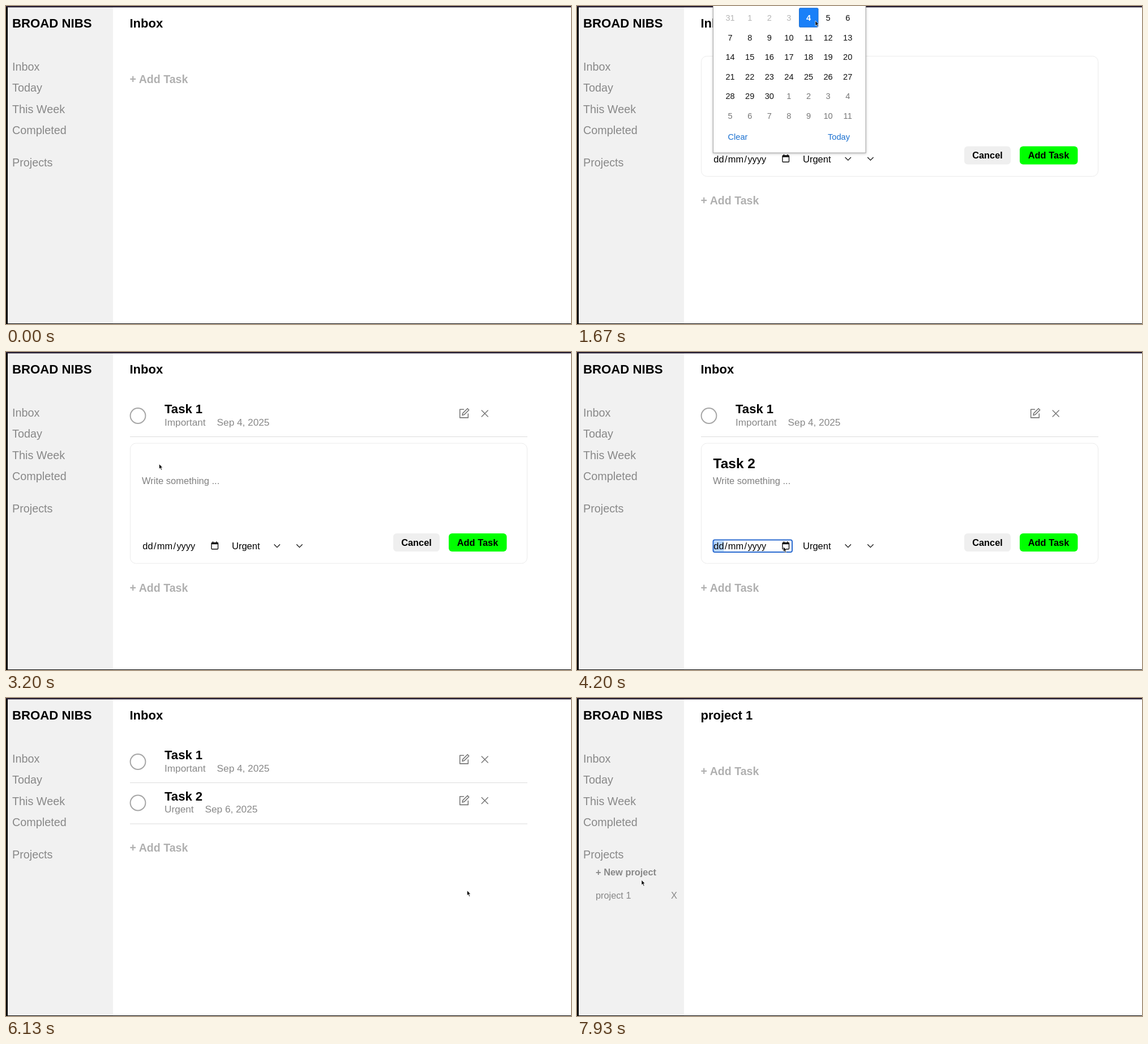
An HTML page for the animation above (8 s loop, 998 px wide and 561 px high).

```html
<!DOCTYPE html>
<html lang="en">
<head>
<meta charset="utf-8">
<title>Task list</title>
<style>
  html, body { margin: 0; width: 100%; height: 100%; overflow: hidden; background: #fff; }
  svg { display: block; width: 100vw; height: 100vh; }
  text { font-family: "Liberation Sans", Arial, sans-serif; }
  .b { font-weight: 700; }
  .m { text-anchor: middle; }
  .line { fill: none; stroke-linecap: round; stroke-linejoin: round; }
  .popup { filter: drop-shadow(0 1px 2px rgba(0, 0, 0, .25)); }
</style>
</head>
<body>
<svg id="stage" viewBox="0 0 998 561"></svg>
<script>
const LOOP = 8000, TICK = LOOP / 120, ROW = 72.5, MOVE = 240;
const GREY = '#888', LEVELS = ['Urgent', 'Important', 'Optional'];
const stage = document.getElementById('stage');

// Both tasks are filled in by the same routine, the second one slower
const rounds = [
  { start: 590, pace: 1, y: 0, title: 'Task 1', day: 4, level: 0 + 1 },
  { start: 3190, pace: 1.25, y: ROW, title: 'Task 2', day: 6, level: 0 }
];
const step = { type: 270, typed: 600, focus: 800, open: 870, pick: 1140, menu: 1460, choose: 1690, list: 1870, submit: 2200 };
const project = { open: 6520, input: 6980, type: 7050, typed: 7500, done: 7590 };

const colX = i => 270.6 + 34.6 * (i % 7);
const rowY = i => 20.8 + 34.55 * Math.floor(i / 7);
const at = (r, u) => r.start + u * r.pace;
const within = (t, a, b) => t >= a && t < b;

// Pointer stops: arrival time, x, y
const roundStops = r => [
  [210, 300, 124], [805, 364, 270.5], [1075, colX(r.day) + 11.5, 25.5],
  [1410, 446, 270], [1600, 452, 275 + 24 * r.level], [1870, 516, 268], [2075, 814, 266.5]
].map(([u, x, y]) => [at(r, u), x, y + r.y]);
const stops = [
  [130, 345, 235], [470, 272, 130], ...roundStops(rounds[0]),
  [3130, 270, 197], ...roundStops(rounds[1]),
  [6430, 60, 277], [6795, 147, 325.5], [6930, 113.5, 320.5]
];

const typed = (str, t, a, b) =>
  str.slice(0, Math.max(0, Math.ceil(str.length * (t - a) / (b - a))));
const text = (x, y, size, fill, str, cls = '') =>
  `<text x="${x}" y="${y}" font-size="${size}" fill="${fill}" class="${cls}">${str}</text>`;
const rect = (x, y, w, h, fill, more = '') =>
  `<rect x="${x}" y="${y}" width="${w}" height="${h}" fill="${fill}" ${more}/>`;
const line = (d, stroke, width) =>
  `<path class="line" d="${d}" stroke="${stroke}" stroke-width="${width}"/>`;
const shift = (y, body) => `<g transform="translate(0 ${y})">${body}</g>`;
const ring = (x, y, w, h) =>
  rect(x, y, w, h, 'none', 'rx="3" stroke="#2a6bd0" stroke-width="2"');
const chevron = x => line(`M${x} 267.3l4.8 4.8l4.8 -4.8`, '#111', 1.3);

function sidebar(t) {
  let s = rect(3, 2, 186, 558, '#f1f1f1') + text(11, 38, 22.2, '#000', 'BROAD NIBS', 'b');
  ['Inbox', 'Today', 'This Week', 'Completed'].forEach((name, i) =>
    s += text(11, 113.8 + 37.4 * i, 19.8, GREY, name));
  s += text(11, 283, 19.8, GREY, 'Projects');
  if (t >= project.open) s += text(33, 312.5, 16.4, GREY, '+ New project', 'b');
  if (within(t, project.input, project.done))
    s += rect(34, 337, 128, 23, '#fff') + ring(34, 337, 128, 23) +
         text(38, 353.8, 16.3, '#000', typed('project 1', t, project.type, project.typed));
  if (t >= project.done)
    s += text(33, 353.5, 16.3, GREY, 'project 1') + text(166, 353.5, 16.4, GREY, 'X');
  return s;
}

function task(r) {
  const level = LEVELS[r.level];
  return shift(r.y,
    '<circle cx="233" cy="112.5" r="13.4" fill="none" stroke="#a6a6a6" stroke-width="2"/>' +
    text(280, 108, 22.1, '#000', r.title, 'b') +
    text(280, 129.5, 17.2, GREY, `${level}<tspan dx="20">Sep ${r.day}, 2025</tspan>`) +
    line('M808.5 101.3h-6.8v14.6h14.6v-6.8', '#777', 1.6) +
    line('M806 111.5l.8 -3.4l8.4 -8.4l2.5 2.5l-8.4 8.4z', '#777', 1.6) +
    line('M840.2 103l11 11m0 -11l-11 11', '#777', 1.5) +
    rect(219, 149, 702, 1, '#dcdcdc'));
}

function dateField(date, focus) {
  const parts = date.split(/(?=\/)|(?<=\/)/);
  return (focus ? rect(241, 261, 18.5, 18, '#b3d4fc') : '') +
    text(240, 275.5, 16.4, '#000', parts.map(p => `<tspan dx="1.35">${p}</tspan>`).join('')) +
    rect(363, 264, 11.5, 11.2, 'none', 'rx="1" stroke="#111" stroke-width="1.4"') +
    rect(363, 263.5, 11.5, 3.2, '#111') +
    line('M365.5 262.3v1.5M372 262.3v1.5', '#111', 1.5) +
    (focus ? ring(240.5, 259, 139.5, 21.5) : '');
}

function form(r, u) {
  const date = u < step.pick ? 'dd/mm/yyyy' : `0${r.day}/09/2025`;
  return shift(r.y,
    rect(219.5, 88.5, 701, 212, '#fff', 'rx="10" stroke="#ebebeb"') +
    text(240.5, 132, 24.5, '#000', typed(r.title, u, step.type, step.typed), 'b') +
    text(240, 160, 16.5, '#808080', 'Write something ...') +
    dateField(date, within(u, step.focus, step.open)) +
    text(399, 275.5, 16.5, '#000', LEVELS[u < step.choose ? 0 : r.level]) +
    chevron(474) + chevron(513.6) +
    (u >= step.list ? ring(503.8, 258.8, 24.8, 21.2) : '') +
    rect(684, 247.5, 82, 32, '#efefef', 'rx="6"') +
    rect(782, 247.5, 102.5, 32, '#0f0', 'rx="6"') +
    text(725, 269, 16.4, '#000', 'Cancel', 'b m') +
    text(833, 269, 16.4, '#000', 'Add Task', 'b m'));
}

function calendar(r, u) {
  let s = `<g class="popup">${rect(240.5, -73, 269.5, 332, '#fff', 'stroke="#a6a6a6"')}</g>` +
    text(261, -44, 14.6, '#111', 'September 2025', 'b') +
    '<path d="M374 -51h8l-4 5z" fill="#111"/>' +
    line('M444 -46v-9m-3.5 3.5l3.5 -3.5l3.5 3.5M478 -55v9m-3.5 -3.5l3.5 3.5l3.5 -3.5', '#333', 1.4);
  [...'SMTWTFS'].forEach((c, i) => s += text(colX(i), -8.5, 14.6, '#111', c, 'm'));
  for (let i = 0; i < 42; i++) {
    const x = colX(i), y = rowY(i), today = i === 4;
    if (today) s += rect(x - 16.4, y - 17, 33.4, 33.4, '#1a80f8', 'rx="1.5" stroke="#1668cc"');
    else if (i === r.day && u > step.pick - 100) s += rect(x - 16.5, y - 16.5, 33, 33, '#e6effb', 'rx="2"');
    const fill = today ? '#fff' : i < 4 ? '#b5b5b5' : i > 30 ? '#777' : '#111';
    s += text(x, y + 5.2, 14.6, fill, (i + 30) % 31 % 30 + 1 + (i ? 0 : 30) - (i > 30 ? 0 : 0), today ? 'b m' : 'm')
      .replace(/>\d+</, `>${i < 1 ? 31 : i > 30 ? i - 30 : i}<`);
  }
  s += text(266.5, 236, 14.6, '#1a70d0', 'Clear') + text(443, 236, 14.6, '#1a70d0', 'Today');
  return shift(r.y, s);
}

function menu(r, u) {
  const hover = u < step.choose - 130 ? 0 : r.level;
  let s = `<g class="popup">${rect(387.5, 254.8, 97.5, 80.3, '#6c6c6c', 'rx="5" stroke="#8a9099"')}</g>` +
    rect(391, 259 + 24.2 * hover, 91, 24, '#559fea', 'rx="3.5"') +
    line('M395 271.5l2 2.4l4 -5.6', '#fff', 1.4);
  LEVELS.forEach((name, i) => s += text(405, 276.5 + 24.2 * i, 16, '#fff', name));
  return shift(r.y, s);
}

function pointer(t) {
  // Out of sight at rest and while typing
  const typing = rounds.some(r => within(t, at(r, step.type), at(r, step.typed)));
  if (typing || t < 125 || within(t, project.input, 7925)) return '';
  const next = stops.findIndex(p => p[0] > t);
  const i = next < 0 ? stops.length - 1 : Math.max(1, next);
  const [t0, x0, y0] = stops[i - 1], [t1, x1, y1] = stops[i];
  const k = Math.min(1, Math.max(0, 1 - (t1 - t) / Math.min(MOVE, t1 - t0)));
  const e = k * k * (3 - 2 * k);
  return `<path transform="translate(${x0 + (x1 - x0) * e} ${y0 + (y1 - y0) * e})"
    d="M.5 .5V9.4L2.5 7.6L4.1 11.2L5.6 10.5L4 7H6.6Z" fill="#000" stroke="#fff" stroke-width=".7"/>`;
}

function scene(t) {
  const inProject = t >= project.done;
  const done = inProject ? [] : rounds.filter(r => t >= at(r, step.submit));
  const r = rounds.find(r => within(t, r.start, at(r, step.submit)));
  const u = r ? (t - r.start) / r.pace : 0;

  let s = rect(0, 0, 998, 561, '#fff') + sidebar(t) +
    text(218.5, 38, 22, '#000', inProject ? 'project 1' : 'Inbox', 'b') +
    done.map(task).join('') + (r ? form(r, u) : '') +
    text(218.5, r ? 350 + r.y : 135.5 + 67.8 * done.length, 19.6, '#b0b0b0', '+ Add Task', 'b') +
    rect(0, 0, 3, 561, '#000') + rect(0, 0, 998, 2.4, '#251c30') + rect(0, 560, 998, 1, '#000');

  if (within(u, step.open, step.pick)) s += calendar(r, u);
  if (within(u, step.menu, step.choose)) s += menu(r, u);
  return s + pointer(t);
}

let last = -1;
function frame(now) {
  const n = Math.floor(((now + 4) % LOOP) / TICK);
  if (n !== last) {
    last = n;
    stage.innerHTML = scene(n * TICK);
  }
  requestAnimationFrame(() => frame(performance.now()));
}
frame(0);
</script>
</body>
</html>
```
